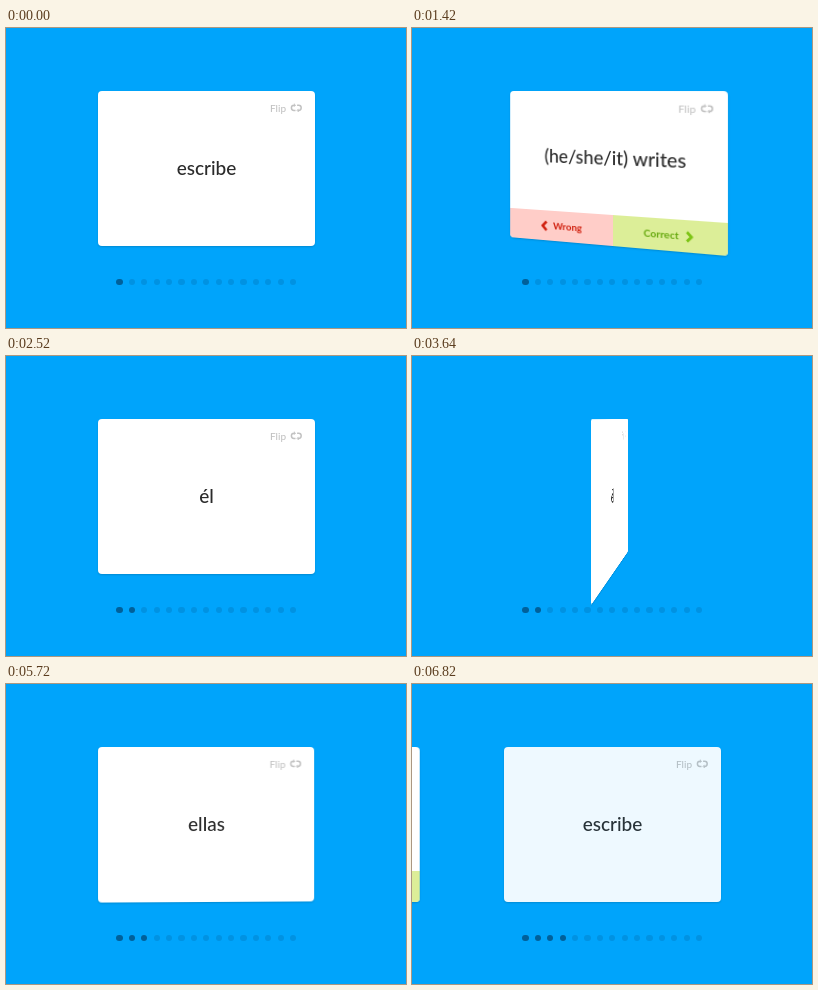
An HTML page that plays this animation: 400 px wide and 300 px high, repeating every 6.86 s.

```html
<!DOCTYPE html>
<html lang="en">
<head>
<meta charset="utf-8">
<title>Flashcards</title>
<style>
  html, body { margin: 0; width: 100%; height: 100%; overflow: hidden; background: #00a4fb; }
  #stage {
    position: absolute; width: 399px; height: 300px; overflow: hidden;
    perspective: 615px; perspective-origin: 92px 62.5px;
    font: 500 19px Lato, sans-serif; color: #2b2b2b;
  }
  .card { position: absolute; left: 92px; top: 62.5px; width: 217px; height: 155px; transform-style: preserve-3d; }
  .face {
    position: absolute; inset: 0; overflow: hidden; border-radius: 4px; background: #fff;
    box-shadow: 0 1px 2px rgba(0, 0, 0, .16); backface-visibility: hidden;
  }
  .back { transform: rotateY(180deg); }
  .word { line-height: 154px; text-align: center; white-space: nowrap; }
  .back .word { line-height: 135px; font-size: 18.7px; }
  .flip { position: absolute; left: 172px; top: 11px; font-size: 10px; line-height: 12px; color: #c2c2c2; }
  .face svg { position: absolute; fill: none; stroke: currentColor; }
  .flip svg { left: 20px; top: 1px; stroke-width: 1.5; }
  .answer { position: absolute; top: 124px; height: 31px; font: bold 10px/31px Lato, sans-serif; }
  .answer span { position: absolute; }
  .answer svg { top: 10px; stroke-width: 2.6; }
  .wrong { left: 0; width: 109px; background: #ffcdc8; color: #d0200f; }
  .right { left: 109px; width: 108px; background: #dcee98; color: #66a80f; }
  .right svg { color: #7cc414; }
  .dot { position: absolute; top: 250.8px; width: 6.4px; height: 6.4px; border-radius: 50%; }
</style>
</head>
<body>
<div id="stage"></div>
<script>
const LOOP = 6860, FLIP_TIME = 635, DOTS = 15;
const stage = document.getElementById('stage');

// dir: -1 leaves to the left (correct), 1 leaves to the right (wrong)
const cards = [
  { front: 'escribe', back: '(he/she/it) writes', flipAt: 998, slideAt: 1920, dir: -1 },
  { front: 'él', back: 'he', flipAt: 3398, slideAt: 4120, dir: 1 },
  { front: 'ellas', back: 'they', flipAt: 5678, slideAt: 6384, dir: -1 },
  { front: 'escribe', back: '', flipAt: Infinity, slideAt: Infinity, dir: -1 }
];

const halfLoop = '<path d="M5.5 7.4H4A2.6 2.6 0 0 1 4 2.2H5"/><path d="M3.9 .6L5.5 2.2L3.9 3.8" stroke-width="1"/>';
const flipLabel = `<div class="flip">Flip
  <svg width="14" height="10">${halfLoop}<g transform="rotate(180 6.3 4.8)">${halfLoop}</g></svg></div>`;
const chevron = (x, path) => `<svg width="10" height="12" style="left:${x}px"><path d="${path}"/></svg>`;
const answers = `
  <div class="answer wrong">${chevron(33, 'M7 1.5L2.8 6L7 10.5')}<span style="left:47px">Wrong</span></div>
  <div class="answer right"><span style="left:30px">Correct</span>${chevron(68, 'M3 1.5L7.2 6L3 10.5')}</div>`;

cards.forEach((card, i) => {
  card.el = document.createElement('div');
  card.el.className = 'card';
  card.el.style.zIndex = cards.length - i;
  card.el.innerHTML = `
    <div class="face"><div class="word">${card.front}</div>${flipLabel}</div>
    <div class="face back"><div class="word">${card.back}</div>${flipLabel}${answers}</div>`;
  stage.append(card.el);
});

const dots = Array.from({ length: DOTS }, (_, i) => {
  const dot = document.createElement('div');
  dot.className = 'dot';
  dot.style.left = 110.3 + i * 12.4 + 'px';
  stage.append(dot);
  return dot;
});

const clamp = x => Math.min(1, Math.max(0, x));
const smooth = x => x * x * (3 - 2 * x);

// cubic-bezier(.5, 0, .3, 1)
function ease(x) {
  let lo = 0, hi = 1;
  for (let n = 0; n < 24; n++) {
    const s = (lo + hi) / 2, r = 1 - s;
    if (3 * r * r * s * .5 + 3 * r * s * s * .3 + s ** 3 < x) lo = s;
    else hi = s;
  }
  return smooth(hi);
}

function draw(t) {
  cards.forEach((card, i) => {
    const angle = 180 * ease(clamp((t - card.flipAt) / FLIP_TIME));
    const shift = 124 * (Math.max(0, t - card.slideAt) / 300) ** 2.36;
    const opacity = i ? smooth(clamp((t - cards[i - 1].slideAt - 100) / 400)) : 1;
    card.el.style.transform = `translateX(${card.dir * shift}px) rotateY(${angle}deg)`;
    card.el.style.opacity = opacity;
    card.el.style.visibility = opacity > 0 && shift < 320 ? 'visible' : 'hidden';
  });
  const done = cards.filter(card => t >= card.slideAt + 40).length;
  dots.forEach((dot, i) => {
    dot.style.background = i <= done ? '#00609a' : '#0092e2';
  });
}

function tick(now) {
  draw(now % LOOP);
  requestAnimationFrame(tick);
}
draw(0);
requestAnimationFrame(tick);
</script>
</body>
</html>
```
